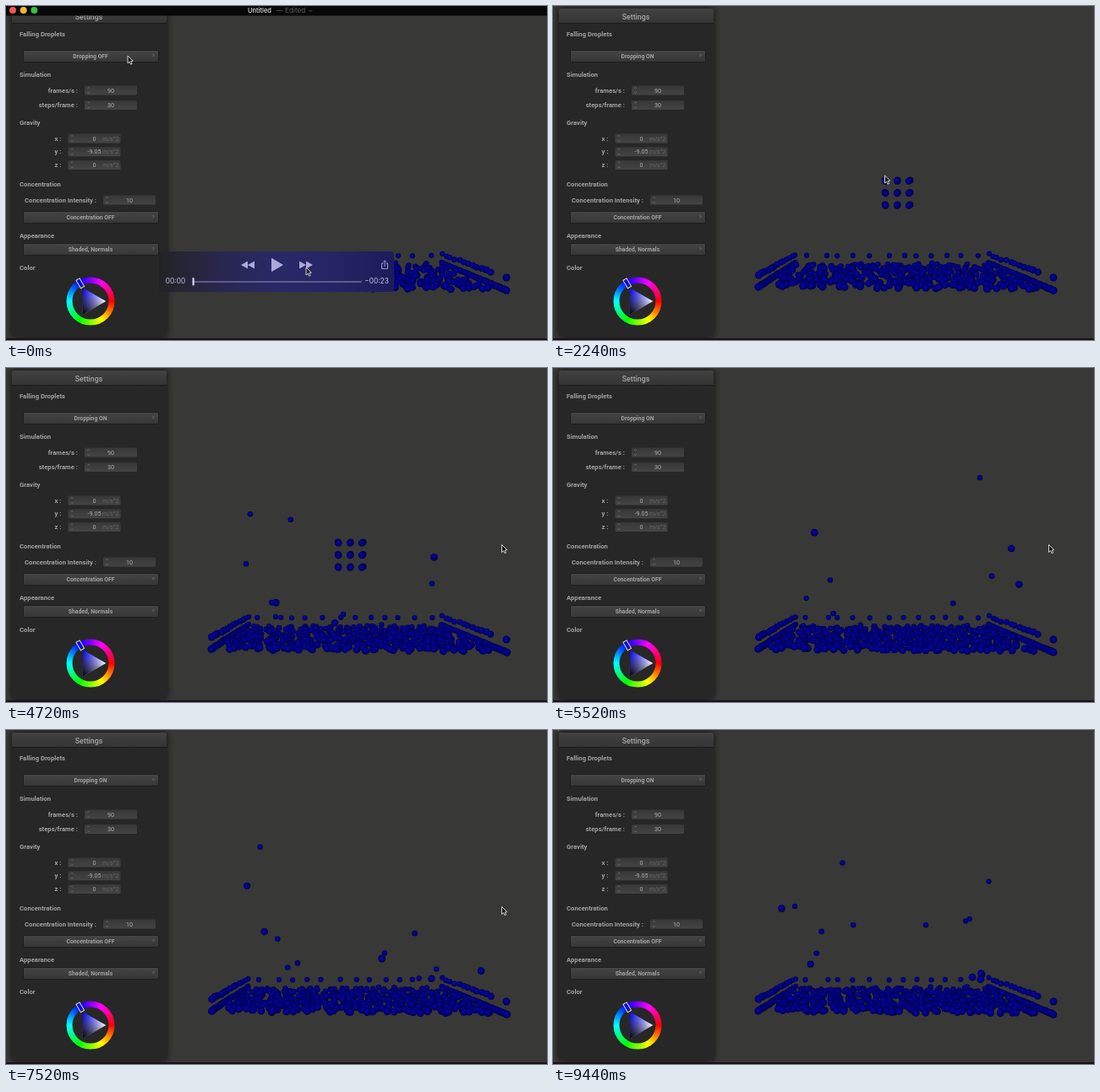
An HTML page with a canvas that plays this animation: 640x396 px, repeating every 9.52 s.

```html
<!DOCTYPE html>
<html lang="en">
<head>
<meta charset="utf-8">
<title>Falling droplets</title>
<style>
html, body { margin: 0; width: 100%; height: 100%; overflow: hidden; background: #383837; }
canvas { display: block; }
</style>
</head>
<body>
<canvas id="stage" width="640" height="396"></canvas>
<script>
const ctx = document.getElementById('stage').getContext('2d');
const LOOP = 9520, STEP = 80;
const SWITCH_ON = 1200, FIRST_DROP = 2240, DROP_EVERY = 1240, FIRST_SPLASH = 2500;
const GRAVITY = 2800;

const lerp = (a, b, k) => a + (b - a) * k;
const clamp = v => Math.max(0, Math.min(1, v));
const smooth = k => k * k * (3 - 2 * k);
const polar = (cx, cy, r, deg) => [cx + r * Math.cos(deg * Math.PI / 180), cy + r * Math.sin(deg * Math.PI / 180)];
let seed = 7;
function rnd() {
  seed = (seed + 0x6d2b79f5) | 0;
  let v = Math.imul(seed ^ (seed >>> 15), seed | 1);
  v ^= v + Math.imul(v ^ (v >>> 7), v | 61);
  return ((v ^ (v >>> 14)) >>> 0) / 4294967296;
}
const jitter = size => (rnd() - 0.5) * size;

// ---------- drawing helpers ----------
function text(str, x, y, size, color, align = 'left', weight = 700, family = 'Roboto') {
  ctx.font = `${weight} ${size}px ${family}, sans-serif`;
  ctx.textAlign = align;
  ctx.textBaseline = 'middle';
  ctx.fillStyle = color;
  ctx.fillText(str, x, y + 0.5);
}
function gradient(x0, y0, x1, y1, ...colors) {
  const g = ctx.createLinearGradient(x0, y0, x1, y1);
  colors.forEach((c, i) => g.addColorStop(i / (colors.length - 1), c));
  return g;
}
function box(x, y, w, h, fill, radius = 1, stroke) {
  ctx.beginPath();
  ctx.roundRect(x, y, w, h, radius);
  ctx.fillStyle = fill;
  ctx.fill();
  if (stroke) { ctx.strokeStyle = stroke; ctx.lineWidth = 1; ctx.stroke(); }
}
function shape(points, fill, stroke, width = 1) {
  ctx.beginPath();
  points.forEach(p => ctx.lineTo(...p));
  ctx.closePath();
  if (fill) { ctx.fillStyle = fill; ctx.fill(); }
  if (stroke) { ctx.strokeStyle = stroke; ctx.lineWidth = width; ctx.stroke(); }
}
function line(color, width, ...points) {
  ctx.beginPath();
  points.forEach(p => ctx.lineTo(...p));
  ctx.strokeStyle = color;
  ctx.lineWidth = width;
  ctx.stroke();
}
// Small open arrow head; the tip lies in direction (dx, dy).
function chevron(x, y, dx, dy, size, color) {
  line(color, 0.8, [x - dy * size, y - dx * size], [x + dx * size, y + dy * size], [x + dy * size, y + dx * size]);
}
function disc(x, y, r, fill) {
  ctx.beginPath();
  ctx.arc(x, y, r, 0, Math.PI * 2);
  ctx.fillStyle = fill;
  ctx.fill();
}
function ball(x, y, r) {
  const g = ctx.createRadialGradient(x - r * 0.2, y - r * 0.3, 0, x, y, r);
  g.addColorStop(0, '#0606a6');
  g.addColorStop(0.55, '#01018c');
  g.addColorStop(1, '#000042');
  disc(x, y, r, g);
}

// ---------- the tank: depth 0 is the back wall, 1 the front ----------
const radiusAt = depth => lerp(3.1, 4.5, depth);
const floorX = (u, depth) => lerp(lerp(287, 243, depth), lerp(515, 592, depth), u);
const floorY = (u, depth) => lerp(304, lerp(333, 337, u), depth);

const pool = [];
function settle(x, y, depth, sway = 0.4, from = 0) {
  pool.push({ x, y, depth, sway, from, phase: rnd() * 6.28, speed: 0.5 + rnd() * 1.5 });
}
// A row resting along a side wall, lifted above the floor edge.
function wallRow(side, lift, count, reach, scatter) {
  for (let i = 0; i < count; i++) {
    const depth = i / (count - 1) * reach;
    settle(floorX(side, depth) + jitter(scatter), floorY(side, depth) - lift * (1 + depth * 0.5) + jitter(scatter), depth);
  }
}
wallRow(0, 0, 22, 1, 0.5);
wallRow(1, 0, 30, 1, 0.5);
wallRow(0, 9.5, 13, 1, 1.5);
wallRow(1, 9.5, 12, 0.75, 2);
settle(592, 322, 1, 0);
for (let i = 0; i < 12; i++) settle(303 + i * 18 + jitter(10), 296, 0, 1.5);

// Evenly spread floor layer that thickens as droplets arrive.
for (let i = 0; i < 470; i++) {
  const u = 0.03 + 0.93 * (i * 0.7549 % 1), depth = 0.07 + 0.91 * (i * 0.5698 % 1);
  settle(floorX(u, depth) + jitter(5), Math.min(335, floorY(u, depth) + jitter(3)), depth, 4, i < 310 ? 0 : (i - 310) * 35);
}
pool.sort((a, b) => a.depth - b.depth);

function drawPool(t) {
  for (const p of pool) {
    if (t < p.from) continue;
    const a = p.phase + t / 1000 * p.speed;
    ball(p.x + Math.sin(a) * p.sway, p.y + Math.cos(a * 1.3) * p.sway * 0.2, radiusAt(p.depth));
  }
}

// ---------- splashes: ballistic hops, most of them close to the side walls ----------
const hops = [];
for (let i = 0; i < 210; i++) {
  const depth = rnd() < 0.65 ? rnd() * 0.2 : 0.7 + rnd() * 0.3;
  const edge = rnd() * 0.25;
  const u = rnd() < 0.35 ? rnd() : rnd() < 0.5 ? edge : 1 - edge;
  const height = 12 + 175 * Math.pow(rnd(), 1.7);
  const x = floorX(u, depth);
  hops.push({
    x, depth,
    apexY: floorY(u, depth) - height,
    apexTime: FIRST_SPLASH + Math.sqrt(2 * height / GRAVITY) * 1000 + rnd() * 6900,
    drift: (x - 407) * 0.2 * rnd()
  });
}
function drawHops(t) {
  if (t < FIRST_SPLASH) return;
  for (const h of hops) {
    const s = (t - h.apexTime) / 1000;
    const y = h.apexY + GRAVITY / 2 * s * s;
    if (y < floorY(0.5, h.depth)) ball(h.x + h.drift * s, y, radiusAt(h.depth));
  }
}

// ---------- falling cube of droplets ----------
function drawDrops(t) {
  if (t < FIRST_DROP) return;
  const s = (t - FIRST_DROP) % DROP_EVERY / 1000;
  const fall = GRAVITY / 2 * s * s;
  for (let layer = 1; layer >= -1; layer--)
    for (let row = 0; row < 3; row++)
      for (let col = 0; col < 3; col++) {
        const y = 207 + row * 14.5 + fall - layer * 0.6;
        if (y < 318) ball(393 + col * 14.4 + layer * (col - 0.6) * 0.6, y, 4 - layer * 0.2);
      }
}

// ---------- settings panel ----------
const LABEL = '#a2a2a2', VALUE = '#adadad', DIM = '#666666';

function heading(name, y) { text(name, 16, y, 7.7, LABEL); }
function button(label, y) {
  box(20.5, y - 7, 160, 14, gradient(0, y - 7, 0, y + 7, '#454545', '#363636'), 1.5, '#1e1e1e');
  text(label, 100, y, 6.8, LABEL, 'center');
  chevron(173.5, y - 1, 1, 0, 1.5, '#808080');
}
function field(label, value, x, y, unit) {
  text(label, x - 8, y, 7.7, LABEL, 'right');
  box(x, y - 5.5, 62, 11, gradient(0, y - 5, 0, y + 5, '#383838', '#434343'), 1.5);
  chevron(x + 4.6, y - 2.2, 0, -1, 1.4, '#777');
  chevron(x + 4.6, y + 2.2, 0, 1, 1.4, '#777');
  text(value, x + 31, y, 7.2, VALUE, 'center', 400);
  if (unit) text(unit, x + 60, y, 7, DIM, 'right', 400);
}
function colorWheel(cx, cy, pick) {
  const hue = ctx.createConicGradient(0, cx, cy);
  for (let i = 0; i <= 6; i++) hue.addColorStop(i / 6, `hsl(${i * 60} 100% 50%)`);
  ctx.beginPath();
  ctx.arc(cx, cy, 25, 0, Math.PI * 2);
  ctx.strokeStyle = hue;
  ctx.lineWidth = 7;
  ctx.stroke();

  const [pure, white, black] = [pick, pick + 120, pick + 240].map(deg => polar(cx, cy, 18.3, deg));
  const middle = [(pure[0] + white[0]) / 2, (pure[1] + white[1]) / 2];
  shape([pure, white, black], gradient(...pure, ...white, `hsl(${pick} 100% 50%)`, '#fff'));
  shape([pure, white, black], gradient(...middle, ...black, '#0000', '#000'));

  ctx.save();
  ctx.translate(cx, cy);
  ctx.rotate(pick * Math.PI / 180);
  ctx.strokeStyle = '#d8d8d8';
  ctx.lineWidth = 1;
  ctx.strokeRect(19, -2.4, 11, 4.8);
  ctx.restore();
}
function drawPanel(t) {
  ctx.save();
  ctx.shadowColor = 'rgba(0,0,0,.75)';
  ctx.shadowBlur = 9;
  box(7, 3, 183, 389, '#272727', 2);
  ctx.restore();
  box(7, 3, 183, 17, gradient(0, 3, 0, 20, '#424242', '#343434'), [2, 2, 0, 0]);
  box(7, 20, 183, 1, '#1b1b1b', 0);
  text('Settings', 98, 12.5, 8.8, '#a8a8a8', 'center', 500);

  heading('Falling Droplets', 33);
  button(t < SWITCH_ON ? 'Dropping OFF' : 'Dropping ON', 59.5);
  heading('Simulation', 81);
  field('frames/s :', '90', 93, 100);
  field('steps/frame :', '30', 93, 117.5);
  heading('Gravity', 138);
  ['0', '-9.05', '0'].forEach((g, i) => field('xyz'[i] + ' :', g, 73.5, 157 + i * 15.7, 'm/s^2'));
  heading('Concentration', 211);
  field('Concentration Intensity :', '10', 115, 230);
  button('Concentration OFF', 250.5);
  heading('Appearance', 272);
  button('Shaded, Normals', 288.5);
  heading('Color', 310);
  colorWheel(100, 350, 240);
}

// ---------- video player chrome ----------
function drawTitleBar() {
  box(0, 0, 640, 11.5, '#080808', 0);
  ['#f4564f', '#f6b62d', '#34c23f'].forEach((c, i) => disc(8 + i * 12.7, 5, 4, c));
  text('Untitled', 314, 5, 7.5, '#e4e4e4', 'right', 500, 'Inter');
  text('— Edited', 319.5, 5, 8.2, '#5c5c5c', 'left', 400, 'Inter');
  chevron(360.3, 5, 0, 1, 2, '#5c5c5c');
}
function drawControls() {
  const tint = '#aaa8dc', bright = '#c4c2e4';
  const arrow = (x, w, h) => shape([[x, 307 - h], [x + w, 307], [x, 307 + h]], tint);
  box(181, 291, 278, 48, gradient(181, 0, 459, 0, '#232326', '#28274c', '#2a2968', '#252464', '#1d1c5a'), 4);
  arrow(314, 14, 8.2);
  for (let i = 0; i < 2; i++) {
    arrow(347 + i * 8, 8, 4.6);
    arrow(294 - i * 8, -8, 4.6);
  }
  line(tint, 0.9, [446.5, 305], [444.5, 305], [444.5, 311.5], [451.5, 311.5], [451.5, 305], [449.5, 305]);
  line(tint, 0.9, [448, 309], [448, 302]);
  chevron(448, 303.5, 0, -1, 1.8, tint);
  box(221, 326, 200, 2, '#5d5b8c');
  box(220.5, 322, 2.2, 9.5, '#d6d4ee');
  text('00:00', 200.5, 326.5, 8.3, bright, 'center', 400, 'Inter');
  text('−00:23', 438.5, 326.5, 8.3, bright, 'center', 400, 'Inter');
  drawCursor(355, 310);
}

// ---------- pointer ----------
const pointerPath = [
  { t: 0, x: 144, y: 59 }, { t: 1360, x: 144, y: 59 },
  { t: 2240, x: 392.5, y: 201 }, { t: 3040, x: 586.5, y: 209.5 },
  { t: 8960, x: 586.5, y: 209.5 }, { t: 9440, x: 2.5, y: -10 }
];
function drawCursor(x, y) {
  const outline = [[0, 0], [0, 9], [2.1, 7.1], [3.5, 10.2], [5.1, 9.5], [3.7, 6.5], [6.3, 6.2]];
  shape(outline.map(([dx, dy]) => [x + dx, y + dy]), '#161616', '#e2e2e2', 0.9);
}
function drawPointer(t) {
  const next = pointerPath.findIndex(p => t < p.t);
  const b = pointerPath.at(next), a = next > 0 ? pointerPath[next - 1] : b;
  const k = a === b ? 0 : smooth((t - a.t) / (b.t - a.t));
  drawCursor(lerp(a.x, b.x, k), lerp(a.y, b.y, k));
}

function render(t) {
  box(0, 0, 640, 396, '#383837', 0);
  drawPool(t);
  drawHops(t);
  drawDrops(t);
  drawPanel(t);
  box(0, 394, 640, 2, '#1b1115', 0);
  drawPointer(t);
  const chrome = 1 - clamp((t - 240) / 480);
  if (chrome > 0) {
    ctx.globalAlpha = chrome;
    drawTitleBar();
    drawControls();
    ctx.globalAlpha = 1;
  }
}

const start = performance.now();
function tick() {
  const t = (performance.now() - start) % LOOP;
  render(Math.floor(t / STEP) * STEP);
  requestAnimationFrame(tick);
}
tick();
</script>
</body>
</html>
```
